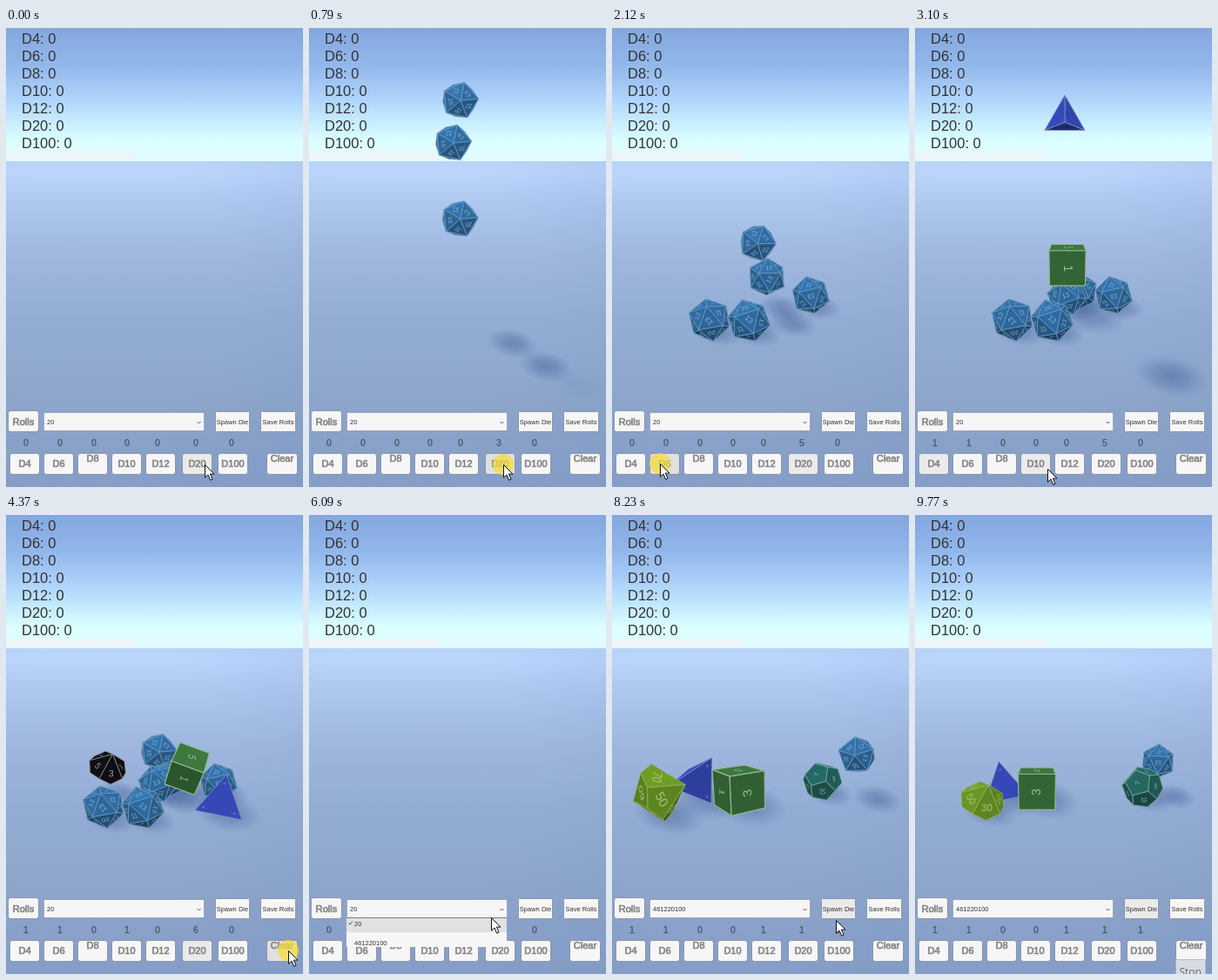
Recreate the animation shown at these times as an HTML page with a canvas. Size 341 by 527 pixels, loop 9.82 s.

```html
<!DOCTYPE html>
<html lang="en">
<head>
<meta charset="utf-8">
<title>Dice roller</title>
<style>
  html, body { margin: 0; width: 100%; height: 100%; overflow: hidden; background: #8fa8cf; }
  canvas, svg { position: absolute; left: 0; top: 0; width: 341px; height: 527px; display: block; }
  text { font-family: "Liberation Sans", Arial, sans-serif; fill: #323232; }
  .hud { font-size: 16.5px; }
  .soft { font-size: 11px; fill: #777; stroke: #888; stroke-width: .7; text-anchor: middle; filter: blur(.6px); }
  .small { font-size: 7.5px; }
  .mid { text-anchor: middle; }
  .count { font-size: 10.5px; fill: #4a5262; stroke: #4a5262; stroke-width: .25; text-anchor: middle; }
  .tip { font: 12px "Open Sans", sans-serif; fill: #666; }
</style>
</head>
<body>
<canvas id="scene" width="341" height="527"></canvas>
<svg id="ui" viewBox="0 0 341 527"></svg>
<script>
const LOOP = 9820, CLEARED = 4430, OPENED = 5600, PICKED = 6690, THROWN = 7290;
const W = 341, H = 527, PHI = (1 + Math.sqrt(5)) / 2, PI = Math.PI;
const ctx = document.getElementById('scene').getContext('2d');
const ui = document.getElementById('ui');

const clamp = v => Math.max(0, Math.min(1, v));
const mix = (a, b, p) => a + (b - a) * p;
const smooth = v => { const p = clamp(v); return p * p * (3 - 2 * p); };
const random = seed => { const v = Math.sin(seed * 12.9898) * 43758.5453; return v - Math.floor(v); };

// ---- vectors and solids ----
const sub = (a, b) => a.map((v, i) => v - b[i]);
const dot = (a, b) => a[0] * b[0] + a[1] * b[1] + a[2] * b[2];
const mul = (a, k) => a.map(v => v * k);
const norm = a => mul(a, 1 / Math.hypot(...a));
const mean = list => [0, 1, 2].map(i => list.reduce((s, p) => s + p[i], 0) / list.length);
const cross = (a, b) => [a[1] * b[2] - a[2] * b[1], a[2] * b[0] - a[0] * b[2], a[0] * b[1] - a[1] * b[0]];
const SIGNS = [-1, 1];

function cyclic(a, b) {
  return SIGNS.flatMap(s => SIGNS.flatMap(t =>
    [[0, s * a, t * b], [s * a, t * b, 0], [t * b, 0, s * a]]));
}
const cube = SIGNS.flatMap(x => SIGNS.flatMap(y => SIGNS.map(z => [x, y, z])));

function trapezohedron() {
  const h = 0.105, c = Math.cos(PI / 5), top = h * (1 + c) / (1 - c);
  const ring = Array.from({ length: 10 }, (_, i) =>
    [Math.cos(i * PI / 5), Math.sin(i * PI / 5), i % 2 ? h : -h]);
  return [...ring, [0, 0, top], [0, 0, -top]];
}

function tetrahedron() {
  const r = Math.sqrt(8) / 3;
  const ring = [0, 1, 2].map(i => (i * 4 - 3) * PI / 6);
  return [[0, 0, 1], ...ring.map(a => [r * Math.cos(a), r * Math.sin(a), -1 / 3])];
}

// Faces of the convex hull, each with its vertices in order around the centre.
function hull(raw) {
  const size = Math.max(...raw.map(p => Math.hypot(...p)));
  const pts = raw.map(p => mul(p, 1 / size)), seen = new Set(), faces = [];
  const count = pts.length;
  for (let i = 0; i < count; i++) for (let j = i + 1; j < count; j++) for (let k = j + 1; k < count; k++) {
    let n = norm(cross(sub(pts[j], pts[i]), sub(pts[k], pts[i]))), d = dot(n, pts[i]);
    if (d < 0) { n = mul(n, -1); d = -d; }
    if (d < 0.05 || pts.some(p => dot(n, p) > d + 1e-3)) continue;
    const ring = pts.filter(p => Math.abs(dot(n, p) - d) < 2e-3), key = ring.join();
    if (seen.has(key)) continue;
    seen.add(key);
    const c = mean(ring), u = norm(sub(ring[0], c)), w = cross(n, u);
    const angle = p => Math.atan2(dot(sub(p, c), w), dot(sub(p, c), u));
    ring.sort((a, b) => angle(a) - angle(b));
    faces.push({ n, c, ring });
  }
  return faces;
}

function build(points, look, label) {
  const faces = hull(points), square = points === cube;
  faces.forEach((f, i) => {
    const spots = square ? f.ring.map((p, k) => mean([p, f.ring[(k + 1) % 4]])) : f.ring;
    const score = square ? p => p[0] + p[2] / 2 : p => Math.hypot(...sub(p, f.c));
    const best = spots.reduce((a, b) => score(b) > score(a) + 1e-6 ? b : a);
    f.up = norm(sub(best, f.c));
    f.right = cross(f.n, f.up);
    f.text = String(label(i, f.n));
  });
  return { faces, ...look };
}
const cubeLabel = (i, n) => n[2] > .9 ? 1 : n[0] > .9 ? 3 : n[1] < -.9 ? 5 : n[1] > .9 ? 2 : n[0] < -.9 ? 4 : 6;
const KINDS = {
  d4: build(tetrahedron(), { rgb: [52, 70, 178], edge: '#8592c4', ink: '#a5aedc', font: .15, r: 33 }, i => i + 1),
  d6: build(cube, { rgb: [54, 106, 56], edge: '#97b594', ink: '#b9cdb8', font: .42, r: 37.5 }, cubeLabel),
  d10: build(trapezohedron(), { rgb: [15, 15, 19], edge: '#90939a', ink: '#bfc1c6', font: .48, r: 27 }, i => i),
  d12: build(cyclic(1 / PHI, PHI).concat(cube), { rgb: [34, 95, 90], edge: '#82ada6', ink: '#aecbc4', font: .36, r: 26 }, i => i + 1),
  d20: build(cyclic(1, PHI), { rgb: [44, 102, 154], edge: '#709abc', ink: '#a9c6dc', font: .34, r: 25 }, i => i + 1),
  d100: build(trapezohedron(), { rgb: [98, 140, 34], edge: '#98b068', ink: '#c0d094', font: .46, r: 27 }, i => i + '0')
};

// ---- dice: free fall to a landing point, a wait, then a roll to rest ----
const GRAVITY = 485e-6, FLOOR = 302, SPAWN = [172, 72];
const dice = [];

function drop(t, kind, land, rest, options) {
  dice.push({
    t, kind, land, rest, from: SPAWN, wait: 430, roll: 420, near: .9, over: 0, push: 0, end: CLEARED,
    fallPose: [.55, .05, .2], restPose: [-.05, -.36, random(dice.length + 1) * 6], ...options
  });
}
function toss(kind, from, land, rest, near, options) {
  drop(THROWN, kind, land, rest, { from, near, wait: 0, roll: 900, end: LOOP, ...options });
}

const TEN = { fallPose: [.2, 1.3, -.25], restPose: [.7, .1, .2] };
[[228, 307], [112, 335], [157, 336], [174, 308], [188, 302]].forEach((rest, i) =>
  drop(240 + 200 * i, 'd20', [173 - 14 * Math.sin(i * 1.7), 310 - 33 * Math.min(i, 2)], rest, { push: i ? 0 : 16 }));
drop(2150, 'd6', [175, 271], [208, 291], { over: 20, fallPose: [-.25, 0, 0], restPose: [-.72, 0, .35] });
drop(2840, 'd4', [172, 232], [247, 329], { fallPose: [-.1, 0, 0], restPose: [0, PI, .2] });
drop(3270, 'd10', [160, 262], [117, 289], { wait: 0, ...TEN });
drop(3600, 'd20', [175, 272], [175, 272]);

toss('d20', [282, 49], [282, 283], [279, 283], .93);
toss('d12', [210, 178], [223, 300], [261, 312], .84, { restPose: [.2, .3, .1] });
toss('d4', [60, -3], [95, 310], [102, 312], 1.05, { fallPose: [.5, PI, 2.74], restPose: [0, PI, -.2] });
toss('d6', [163, 160], [148, 320], [140, 313], 1.05, { fallPose: [-.28, -.78, -.06], restPose: [-.25, -PI / 2, 0] });
toss('d100', [121, 46], [50, 327], [78, 327], 1.3, TEN);
const drawOrder = [...dice].sort((a, b) => a.rest[1] + a.over - b.rest[1] - b.over);

function place(d, t) {
  const [x0, y0] = d.from, [x1, y1] = d.land, [x2, y2] = d.rest;
  const age = t - d.t, drop = Math.sqrt((y1 - y0) / GRAVITY);
  const fall = clamp(age / drop), move = clamp((age - drop - d.wait) / d.roll), p = smooth(move);
  const hop = d.wait ? 0 : 10 * Math.abs(Math.sin(move * 2 * PI)) * (1 - move);
  return {
    x: mix(mix(x0, x1, fall), x2, p) + d.push * smooth((t - 3700) / 400),
    y: mix(mix(y0, y1, fall * fall), y2, p) - hop,
    floor: Math.max(FLOOR, mix(y1, y2, p)),
    r: KINDS[d.kind].r * mix(d.near, .76 + (y2 - 272) * .0038, p),
    turn: d.fallPose.map((a, i) => mix(a, d.restPose[i], p))
  };
}

function rotator(turn) {
  const [cx, sx, cy, sy, cz, sz] = turn.flatMap(a => [Math.cos(a), Math.sin(a)]);
  return ([x, y, z]) => {
    const x1 = x * cy + z * sy, z1 = z * cy - x * sy;
    const y2 = y * cx - z1 * sx, z2 = y * sx + z1 * cx;
    return [x1 * cz - y2 * sz, x1 * sz + y2 * cz, z2];
  };
}

// ---- canvas drawing ----
function gradient(g, stops) {
  stops.forEach(([at, c]) => g.addColorStop(at, c));
  return g;
}
const HORIZON = 153;
const sky = gradient(ctx.createLinearGradient(0, 0, 0, HORIZON), [
  [0, '#84a7dd'], [.28, '#92b7eb'], [.52, '#aed2fa'], [.7, '#c6ecff'], [.85, '#dcffff'], [1, '#e2f9ff']]);
const ground = gradient(ctx.createLinearGradient(0, HORIZON, 0, H), [
  [0, '#bad5fa'], [.04, '#bbd5fd'], [.13, '#adc7ef'], [.3, '#9fb7de'], [.5, '#93acd3'], [.75, '#8da5ca'], [1, '#879fc8']]);
const shade = gradient(ctx.createRadialGradient(110, 300, 150, 110, 300, 420), [
  [0, 'rgba(105,135,188,0)'], [1, 'rgba(105,135,188,.24)']]);

function backdrop() {
  const fill = (style, x, y, w, h) => { ctx.fillStyle = style; ctx.fillRect(x, y, w, h); };
  fill(sky, 0, 0, W, HORIZON);
  fill('rgba(245,243,242,.7)', 0, 143, 147, 7);
  fill(ground, 0, HORIZON, W, H - HORIZON);
  fill(shade, 0, HORIZON, W, H - HORIZON);
}

function shadow({ x, y, r, floor }) {
  const h = Math.max(0, floor - y), spread = 1.25 + h * .001;
  ctx.save();
  ctx.globalAlpha = clamp((222 - h) / 20);
  ctx.translate(x + 8 + h * .58, Math.max(y, floor) + 13 + h * .43);
  ctx.rotate(.22);
  ctx.scale(r * spread, r * spread * .54);
  ctx.fillStyle = gradient(ctx.createRadialGradient(0, 0, 0, 0, 0, 1), [
    [0, 'rgba(66,95,150,.48)'], [.45, 'rgba(70,100,155,.34)'], [1, 'rgba(80,112,170,0)']]);
  ctx.beginPath();
  ctx.arc(0, 0, 1, 0, 7);
  ctx.fill();
  ctx.restore();
}

const LIGHT = norm([-.12, -.75, .6]);
function solid(kind, { x, y, r, turn }) {
  const k = KINDS[kind], rot = rotator(turn);
  const flat = p => { const q = rot(p), s = r * (1 + .12 * q[2]); return [x + q[0] * s, y + q[1] * s]; };
  ctx.lineJoin = 'round';
  ctx.textAlign = 'center';
  ctx.textBaseline = 'middle';
  for (const f of k.faces) {
    const ring = f.ring.map(flat);
    const area = ring.reduce((s, p, i) => {
      const q = ring[(i + 1) % ring.length];
      return s + p[0] * q[1] - p[1] * q[0];
    }, 0);
    if (area <= 0) continue;
    const lit = .8 + .36 * dot(rot(f.n), LIGHT);
    ctx.beginPath();
    ring.forEach(p => ctx.lineTo(...p));
    ctx.closePath();
    ctx.fillStyle = `rgb(${k.rgb.map(v => Math.round(v * lit))})`;
    ctx.fill();
    ctx.strokeStyle = k.edge;
    ctx.lineWidth = kind === 'd6' ? 1.2 : .75;
    ctx.stroke();
    const a = rot(f.right), b = rot(f.up);
    const spots = kind === 'd4' ? f.ring.map(p => mean([p, p, f.c])) : [f.c];
    for (const p of spots) {
      ctx.save();
      ctx.transform(a[0], a[1], -b[0], -b[1], ...flat(p));
      ctx.font = `${r * k.font}px "Liberation Sans", sans-serif`;
      ctx.fillStyle = k.ink;
      ctx.globalAlpha = .8;
      ctx.fillText(f.text, 0, 0);
      ctx.restore();
    }
  }
}

// ---- interface ----
function add(tag, attrs, text = '', parent = ui) {
  const el = document.createElementNS('http://www.w3.org/2000/svg', tag);
  for (const a in attrs) el.setAttribute(a, attrs[a]);
  el.textContent = text;
  parent.appendChild(el);
  return el;
}
const write = (x, y, cls, text, parent) => add('text', { x, y, class: cls }, text, parent);
const box = (x, y, width, height, fill, parent) => add('rect', { x, y, width, height, fill }, '', parent);

const buttons = [];
function button(x, y, w, h, label, cls, ty, rx) {
  const face = add('rect', { x: x + .5, y: y + .5, width: w - 1, height: h - 1, rx, stroke: '#7f899c', 'stroke-width': .8 });
  write(x + w / 2, ty, cls, label);
  buttons.push({ face, label, x, y, w, h });
}

const NAMES = ['D4', 'D6', 'D8', 'D10', 'D12', 'D20', 'D100'];
const COLUMNS = [23, 62, 101, 139, 174, 218, 259];
const counts = NAMES.map((name, i) => {
  write(18, 18 + i * 20, 'hud', name + ': 0');
  button(4 + 39 * i + (i > 4 ? 3 : 0) + (i > 5 ? 2 : 0), 488, 35, 25, name, 'soft', name === 'D8' ? 498 : 504, 3);
  return write(COLUMNS[i], 480, 'count', '0');
});
button(299, 488, 36, 25, 'Clear', 'soft', 498, 3);
button(2, 439, 36, 25, 'Rolls', 'soft', 456, 3);
button(240, 440, 40, 24, 'Spawn Die', 'small mid', 455, 1);
button(292, 440, 41, 24, 'Save Rolls', 'small mid', 455, 1);

add('rect', { x: 43.5, y: 441.5, width: 184, height: 21, fill: '#f6f6f6', stroke: '#8c95a6', 'stroke-width': .7 });
const choice = write(47, 455, 'small', '20');
add('path', { d: 'M219.5 452l2 2 2-2', fill: 'none', stroke: '#444', 'stroke-width': .9 });

const list = add('g', {});
box(43, 463, 184, 33, '#f6f6f6', list);
box(43, 462.5, 184, 16.5, '#e0e1e3', list);
box(43, 462, 184, .8, '#666d7a', list);
add('path', { d: 'M45.5 468.5l1.5 1.7 2.8-3.6', fill: 'none', stroke: '#333', 'stroke-width': .8 }, '', list);
write(52, 471.5, 'small', '20', list);
write(52, 493.5, 'small', '461220100', list);

const tip = add('g', {});
add('rect', { x: 299.5, y: 510.5, width: 34, height: 20, fill: '#d8dbe5', stroke: '#a9b0c0', 'stroke-width': .8 }, '', tip);
write(303.5, 528.5, 'tip', 'Stop', tip);

const halo = add('circle', { r: 12, fill: '#f4dc3c', 'fill-opacity': .75 });
const arrow = add('path', {
  d: 'M.5.5V15.2L4 12 6.6 18.2 9 17.1 6.4 11.1H11Z', fill: '#fff', stroke: '#111', 'stroke-width': 1
});

// The pointer waits at each stop [arrival, x, y], then makes a short eased trip to the next.
const stops = [
  [0, 228, 501], [50, 223, 501], [1350, 201, 504], [2030, 55, 500], [2720, 12, 497], [3090, 152, 506],
  [3500, 217, 500], [4210, 324, 500], [4900, 241, 458], [5450, 209, 453], [6090, 209, 462],
  [6430, 190, 488], [7080, 262, 461], [7520, 257, 465], [8750, 323, 530]];
function pointer(t) {
  const i = stops.findIndex(s => s[0] > t);
  if (i < 0) return stops[stops.length - 1].slice(1);
  const a = stops[i - 1], b = stops[i], trip = Math.min(300, (b[0] - a[0]) * .6);
  const p = smooth((t - b[0] + trip) / trip);
  return [mix(a[1], b[1], p), mix(a[2], b[2], p)];
}

const PRESS = 80;
const clicks = dice.filter(d => d.end === CLEARED).map(d => [d.t, d.kind.toUpperCase()])
  .concat([[CLEARED, 'Clear'], [OPENED, ''], [PICKED, ''], [THROWN, 'Spawn Die']]);

function frame(t) {
  backdrop();
  const live = drawOrder.filter(d => t >= d.t && t < d.end).map(d => ({ kind: d.kind, at: place(d, t) }));
  live.forEach(d => shadow(d.at));
  live.forEach(d => solid(d.kind, d.at));
  counts.forEach((el, i) => el.textContent = live.filter(d => d.kind === NAMES[i].toLowerCase()).length);

  const [x, y] = pointer(t);
  const press = clicks.find(c => t >= c[0] - PRESS && t < c[0]);
  const done = clicks.filter(c => c[0] <= t).pop();
  for (const b of buttons) {
    const over = x >= b.x && x < b.x + b.w && y >= b.y && y < b.y + b.h;
    const held = press && press[1] === b.label, chosen = done && done[1] === b.label;
    b.face.setAttribute('fill', held ? '#e0e0e0' : over || chosen ? '#eaeaeb' : '#f6f6f6');
  }
  choice.textContent = t >= PICKED ? '461220100' : '20';
  list.setAttribute('opacity', t < PICKED ? clamp((t - OPENED) / 150) : 0);
  tip.setAttribute('opacity', t >= 9770 ? 1 : 0);
  halo.setAttribute('opacity', press ? 1 : 0);
  halo.setAttribute('cx', x);
  halo.setAttribute('cy', y);
  arrow.setAttribute('transform', `translate(${x} ${y})`);
}

const start = performance.now();
function tick() {
  frame((performance.now() - start) % LOOP);
  requestAnimationFrame(tick);
}
tick();
</script>
</body>
</html>
```
